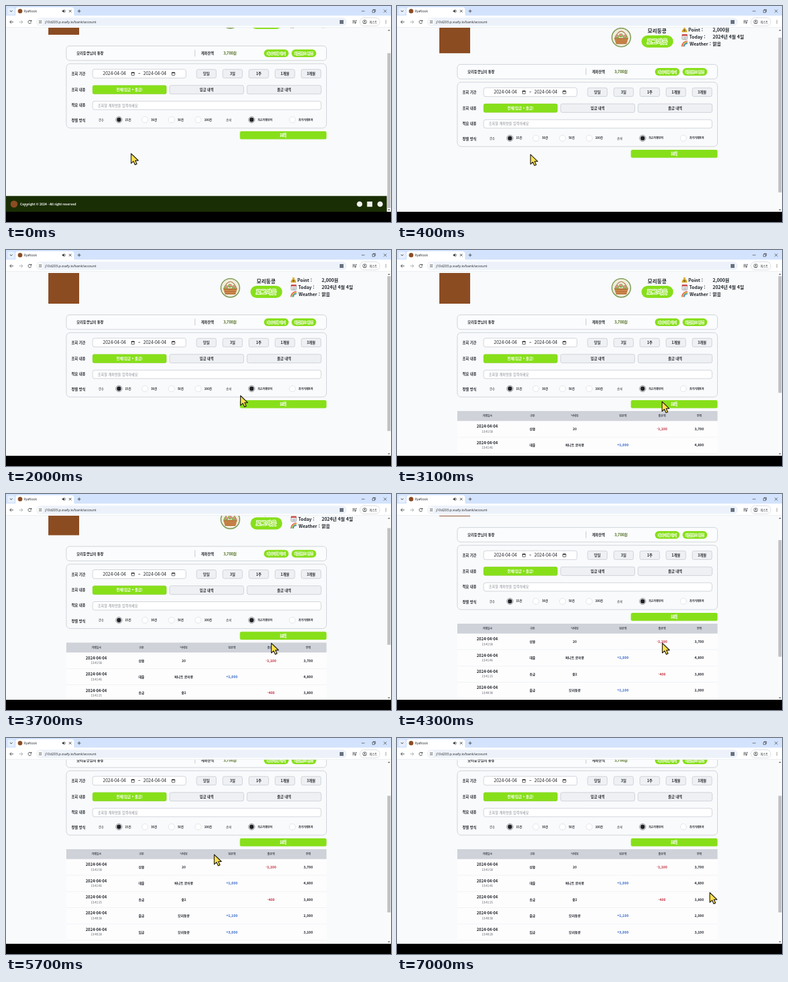
Animation of 600 by 338 pixels, one loop 7100 ms. Source, as an HTML page:

```html
<!DOCTYPE html>
<html lang="ko">
<head>
<meta charset="utf-8">
<style>
  html, body { margin: 0; width: 100%; height: 100%; overflow: hidden; background: #000; }
  svg { display: block; width: 100vw; height: 100vh; }
  text { font-family: "Noto Sans CJK KR", "Noto Sans CJK", sans-serif; white-space: pre; }
  .ui { font-family: "Open Sans", "Noto Sans CJK KR", sans-serif; }
</style>
</head>
<body>
<svg viewBox="0 0 600 338">
  <clipPath id="view"><rect y="34" width="600" height="288"/></clipPath>
  <g id="chrome"></g>
  <g clip-path="url(#view)">
    <rect y="34" width="600" height="288" fill="#f8fafb"/>
    <g id="page"><g id="form"></g><g id="table"></g><g id="footer"></g></g>
    <g id="scrollbar"></g>
  </g>
  <path id="cursor" d="M0 0V15.2L3.6 11.9 6.2 17.4 8.9 16.1 6.4 10.8H11.2Z"
        fill="#ffe14d" stroke="#25231a" stroke-width="1.2" stroke-linejoin="round"/>
</svg>
<script>
const $ = id => document.getElementById(id);
const GREEN = '#87df1a', BROWN = '#8b4c22', INK = '#20242a', USER = '모리둥콩', SITE = 'RyeNook';

// Markup helpers
const rect = (x, y, w, h, fill, r = 0, stroke = 'none', sw = .8) =>
  `<rect x="${x}" y="${y}" width="${w}" height="${h}" rx="${r}" fill="${fill}" stroke="${stroke}" stroke-width="${sw}"/>`;
const circle = (x, y, r, fill, stroke = 'none', sw = .7) =>
  `<circle cx="${x}" cy="${y}" r="${r}" fill="${fill}" stroke="${stroke}" stroke-width="${sw}"/>`;
const line = (d, stroke = '#3c4043', sw = .9) =>
  `<path d="${d}" fill="none" stroke="${stroke}" stroke-width="${sw}"/>`;
const text = (x, y, s, size, weight = 700, fill = INK, extra = '') =>
  `<text x="${x}" y="${y}" font-size="${size}" font-weight="${weight}" fill="${fill}" ${extra}>${s}</text>`;
const mid = (x, y, s, size, weight, fill, extra = '') =>
  text(x, y, s, size, weight, fill, 'text-anchor="middle" ' + extra);
const outlined = (x, y, s, size, sw) =>
  mid(x, y, s, size, 700, GREEN, `stroke="#fff" stroke-width="${sw}" paint-order="stroke" stroke-linejoin="round"`);

function browserChrome() {
  const ui = 'class="ui"';
  return rect(0, 0, 600, 16, '#d3e3fd') + rect(0, 15, 600, 19, '#fff') +
    rect(2.5, 2.5, 11, 11, '#e6effd', 3) + line('M6 7l2 2 2-2') +
    '<path d="M12 16q3 0 3-3V6q0-4 4-4H102q4 0 4 4V13q0 3 3 3Z" fill="#fff"/>' +
    circle(22, 8, 3.5, BROWN) + text(28, 10, SITE, 4.8, 400, INK, ui) +
    '<path d="M87.5 7h1.5l2-1.8v5.6l-2-1.8h-1.5Z" fill="#3c4043"/>' + line('M92 6q1.6 2 0 4', '#3c4043', .6) +
    line('M98 6l4 4m0-4l-4 4', '#3c4043', .8) + line('M111.5 8h5m-2.5-2.5v5') +
    line('M554 8h5', '#222', .6) + line('M571 6.7h3.5v3.5h-3.5ZM572.2 6.5v-1h3.5v3.5h-1', '#222', .6) +
    line('M588.5 5.7l4.6 4.6m0-4.6l-4.6 4.6', '#222', .6) +
    line('M11.5 25h-5.5m2.4-2.5L5.9 25l2.5 2.5') + line('M20.5 25h5.5m-2.4-2.5L26.1 25l-2.5 2.5', '#a0a4a8') +
    line('M39 23.4a2.5 2.5 0 1 0 .4 2.3M39.5 22v2h-2') +
    rect(47, 18.3, 484, 13, '#edf2fa', 6.5) + circle(53.5, 24.8, 4.7, '#fff') +
    line('M51 23.5h2.2m1.8 0h1M51 26.2h1m1.8 0h2.2', '#3c4043', .8) +
    circle(54, 23.5, .7, 'none', '#3c4043', .6) + circle(53, 26.2, .7, 'none', '#3c4043', .6) +
    text(61, 26.9, 'j10d203.p.ssafy.io/bank/account', 5.3, 400, '#202124', ui) +
    rect(520, 22, 6, 6, '#687180') +
    line('M540 22.8h4m-4 1.8h4m-4 1.8h2.2M545.2 26.5v-4h1.5', '#3c4043', .8) + circle(544.2, 26.5, 1, '#3c4043') +
    rect(551.5, 18.5, 31, 12.7, '#fff', 6.3, '#c4c8ce', .6) +
    circle(559, 24.8, 3, 'none', '#3c4043', .7) + circle(559, 24, 1, '#3c4043') +
    line('M557.2 26.8q1.8-1.4 3.6 0', '#3c4043', .7) + text(566, 26.6, '게스트', 4.5, 400) +
    [22.8, 24.8, 26.8].map(y => circle(592, y, .6, '#3c4043')).join('') +
    rect(0, 33.3, 600, .7, '#e4e8ee') + rect(0, 322, 600, 16, '#000');
}

function greeting() {
  const arcs = ['#e24b4b', '#f0b73c', '#4caf6a', '#4b83d8']
    .map((c, i) => line(`M${444 + i * 1.3} 73.5A${8.6 - i * 1.3} ${8.6 - i * 1.3} 0 0 1 452.6 ${65 + i * 1.3}`, c, 1.4)).join('');
  return rect(66, 36, 48, 48, BROWN) +
    circle(349.5, 59.3, 14.6, '#f1eddc', '#7f9d58', 1.6) +
    '<path d="M338.5 60h22l-3 9.5h-16Z" fill="#bc763d"/>' + line('M339.5 60q10-21 20 0', '#a9703e', 1.1) +
    line('M340 63.5h19m-18 3h17', '#e0a265', .7) +
    [[343, 58], [349, 56], [355, 58]].map(([x, y]) => circle(x, y, 3, '#7fae4b') + circle(x, y - .7, 1.9, '#ec8b91')).join('') +
    mid(405.3, 52.3, USER, 8) + rect(381, 56, 49.5, 19, GREEN, 9.5) + outlined(405.5, 68.8, '로그아웃', 8.7, 1.8) +
    '<path d="M446 43h4l-1 2q4 3 3 6h-8q-1-3 3-6Z" fill="#d9ac32"/>' + circle(448, 48.2, 1.6, '#8a641c') +
    rect(444.3, 54.7, 8, 8, '#f4f4f4', 1, '#8d939c') + rect(444, 54.3, 8.6, 2.5, '#cf4646', .8) +
    line('M446 59h5m-5 2h5', '#7c838c', .7) + arcs +
    text(454, 50.3, 'Point :', 7) + text(455.5, 61.3, 'Today :', 7) + text(456, 72.2, 'Weather :', 7) +
    text(492, 50.3, '2,000원', 7.2) + text(492, 61.3, '2024년 4월 4일', 7.1) + text(492, 72.2, '맑음', 7.1);
}

function searchForm() {
  const border = '#c6cad1';
  const button = (x, y, w, label) =>
    rect(x, y, w, 13.5, '#eef0f3', 2.5, border) + mid(x + w / 2, y + 8.8, label, 5.5);
  const pill = (x, label) => rect(x, 107, 38.5, 12, GREEN, 6) + outlined(x + 19.2, 114.9, label, 5.1, 1.1);
  const date = x => text(x, 147.3, '2024-04-04', 7, 500) +
    rect(x + 44.5, 142.8, 4.6, 4.6, 'none', .4, '#222', .7) + line(`M${x + 44.5} 143.6h4.6`, '#222', 1.2);
  const radio = (x, label, on, size = 4.4) =>
    circle(x, 217, 4.8, '#fff', on ? '#5b5e63' : '#d7dadf') + (on ? circle(x, 217, 3.4, '#202226') : '') +
    text(x + 9.5, 218.6, label, size, 600);
  return rect(94, 101.5, 405.5, 22.7, '#fbfcfd', 5, border) +
    text(110, 115, USER + '님의 통장', 5.5) + rect(294, 107.5, .8, 10.5, '#b9bdc4') +
    text(304, 115, '계좌잔액', 5.4) + text(339, 115, '3,700원', 5.6, 700, '#456514') +
    pill(402, '계좌이체 하기') + pill(445, '비밀번호 변경') +
    rect(94, 129.3, 405.5, 100.7, '#f9fafc', 6, border) +
    ['조회 기간', '조회 내용', '적요 내용', '정렬 방식'].map((s, i) => text(102, 147 + i * 24.1 + (i ? .7 : 0), s, 5.5)).join('') +
    rect(135, 138, 145.5, 13.8, '#fff', 3, border) + date(151) + date(214) + mid(207.7, 147.3, '~', 6, 600) +
    ['당일', '3일', '1주', '1개월', '3개월'].map((s, i) => button(297 + i * 40.8, 138.2, 30.6, s)).join('') +
    rect(135, 163.2, 115, 13.5, GREEN, 2.5, '#7cc91c', .5) + mid(192.5, 171.9, '전체(입금 + 출금)', 5.5, 700, '#fff') +
    button(255, 163.2, 115.5, '입금 내역') + button(375.7, 163.2, 115.5, '출금 내역') +
    rect(135, 188, 356, 13.2, '#fff', 3, border) + text(143, 196.6, '조회할 계좌명을 입력하세요', 5.4, 500, '#858a92') +
    text(144, 218.7, '건수', 4.7, 500) + text(343, 218.7, '순서', 4.7, 500) +
    radio(176, '15건', true) + radio(216.5, '30건') + radio(258, '50건') + radio(299.5, '100건') +
    radio(382.8, '최근거래먼저', true, 4.1) + radio(446.3, '과거거래먼저', false, 4.1) +
    rect(364.5, 235, 135, 12.5, GREEN, 2.5) + outlined(432, 243.2, '조회', 5.2, 1);
}

function historyTable() {
  const columns = [141, 211, 277, 352, 413, 471];
  const heads = ['거래일시', '구분', '닉네임', '입금액', '출금액', '잔액'];
  const rows = [
    ['13:41:58', '상환', '20', '-1,100', '3,700'],
    ['13:41:46', '대출', '버니트 로아몽', '+1,000', '4,800'],
    ['13:41:15', '송금', '중2', '-400', '3,800'],
    ['13:40:38', '출금', USER, '+1,100', '2,000'],
    ['13:40:28', '입금', USER, '+3,000', '3,100']];
  const row = ([time, kind, nick, amount, balance], i) => {
    const y = 280.1 + i * 25.35, income = amount[0] === '+';
    return mid(140.7, y - 1.8, '2024-04-04', 6, 600) + mid(140.7, y + 5.7, time, 4.3, 500, '#50545b') +
      mid(columns[1], y + 2, kind, 5, 600) + mid(columns[2], y + 2, nick, 5, 600) +
      mid(columns[income ? 3 : 4], y + 2, amount, 5.4, 600, income ? '#2a5fc4' : '#c02a38') +
      mid(columns[5], y + 2, balance, 5.4, 600) + rect(94, y + 12.5, 405.5, .6, '#e9ebee');
  };
  return rect(94, 252, 405.5, 160, '#fdfdfe') + rect(94, 252, 405.5, 15.5, '#cfd2d9') +
    heads.map((s, i) => mid(columns[i], 261.1, s, 4.1, 600, '#3a3f48')).join('') + rows.map(row).join('');
}

function pageFooter() {
  return rect(0, 336.3, 594, 25, '#1a2e05') + circle(12.5, 349, 5.5, BROWN) +
    text(22, 350.8, 'Copyright © 2024 - All right reserved', 4.8, 700, '#fff') +
    circle(551, 349, 4.3, '#eef1ec') + rect(562.7, 345, 8.2, 8.2, '#eef1ec') + circle(583, 349, 4.3, '#eef1ec');
}

function scrollbar(offset, height) {
  return rect(593.5, 34, 6.5, 288, '#fbfbfb') +
    rect(594.3, 41 + 275 * offset / height, 5, 275 * 288 / height, '#c0c1c3') +
    '<path d="M595 39l1.8-2.5 1.8 2.5ZM595 318l1.8 2.5 1.8-2.5Z" fill="#777"/>';
}

// Keys are [time, ...values], eased between neighbours
const SCROLL = [[0, 39], [200, 39], [500, 0], [3500, 0], [3900, 39], [4200, 39], [4500, 78]];
const POINTER = [[0, 195, 231], [200, 195, 231], [900, 261, 238], [1100, 261, 238], [1800, 340, 220],
  [2000, 365.5, 228], [2300, 413, 239], [2600, 413, 239], [2700, 413, 238], [3000, 413, 238], [3400, 413.5, 233.5],
  [5000, 413.5, 233.5], [5700, 324.5, 182.5], [5900, 324.5, 182.5], [6800, 487.5, 242]];

function at(keys, t) {
  const next = keys.findIndex(k => k[0] > t);
  if (next < 0) return keys.at(-1).slice(1);
  const a = keys[next - 1], b = keys[next];
  const p = (t - a[0]) / (b[0] - a[0]), e = p * p * (3 - 2 * p);
  return a.slice(1).map((v, i) => v + (b[i + 1] - v) * e);
}

$('chrome').innerHTML = browserChrome();
$('form').innerHTML = greeting() + searchForm();
$('table').innerHTML = historyTable();
$('footer').innerHTML = pageFooter();

const start = performance.now();
function draw() {
  const t = Math.floor((performance.now() - start) % 7100 / 100) * 100;
  const loaded = t >= 3000;
  const [offset] = at(SCROLL, t), [x, y] = at(POINTER, t);
  $('page').setAttribute('transform', `translate(0 ${-offset})`);
  $('table').style.display = loaded ? '' : 'none';
  $('footer').style.display = loaded ? 'none' : '';
  $('scrollbar').innerHTML = scrollbar(offset, loaded ? 434 : 327);
  $('cursor').setAttribute('transform', `translate(${x} ${y})`);
  requestAnimationFrame(draw);
}
draw();
</script>
</body>
</html>
```
